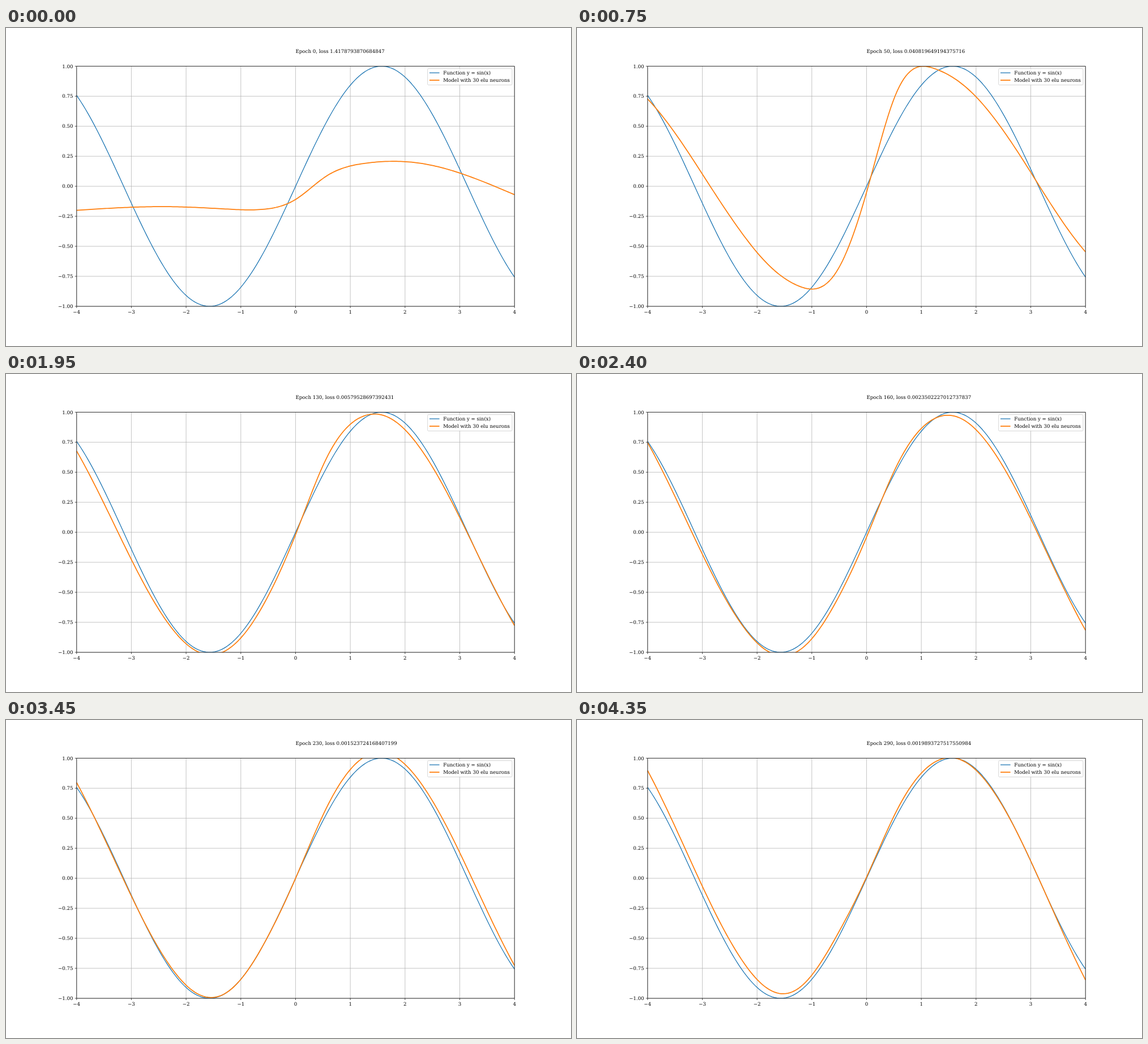
An HTML page that plays this animation: 998x561 px, repeating every 4500 ms.

```html
<!DOCTYPE html>
<html lang="en">
<head>
<meta charset="utf-8">
<title>Learning a sine</title>
<style>
  html, body { margin: 0; width: 100%; height: 100%; overflow: hidden; background: #fff; }
  svg { display: block; width: 100%; height: 100%; }
  text { font: 8.66px "DejaVu Serif", "Noto Serif", serif; fill: #000; text-rendering: geometricPrecision; }
</style>
</head>
<body>
<svg id="stage" viewBox="0 0 998 561">
  <clipPath id="plot"><rect x="124.75" y="67.4" width="773.45" height="423.6"/></clipPath>
</svg>
<script>
const svg = document.getElementById('stage');
const LEFT = 124.75, RIGHT = 898.2, TOP = 67.4, BOTTOM = 491;
const BLUE = '#1f77b4', ORANGE = '#ff7f0e';
const STEP = 150, LOOP = 4500;

const mix = (a, b, u) => a + (b - a) * u;
const px = x => mix(LEFT, RIGHT, (x + 4) / 8);
const py = y => mix(BOTTOM, TOP, (y + 1) / 2);

function add(tag, attrs, content = '') {
  const el = document.createElementNS(svg.namespaceURI, tag);
  for (const key in attrs) el.setAttribute(key, attrs[key]);
  el.textContent = content;
  return svg.appendChild(el);
}
const line = (d, stroke, width, extra) =>
  add('path', { d, stroke, 'stroke-width': width, fill: 'none', ...extra });
const label = (x, y, content, anchor = 'start') =>
  add('text', { x, y, 'text-anchor': anchor }, content);
const signed = (n, digits) => n.toFixed(digits).replace('-', '\u2212');

function curve(f) {
  let d = '';
  for (let i = 0; i <= 200; i++) {
    const x = -4 + i / 25;
    d += (i ? 'L' : 'M') + px(x).toFixed(2) + ' ' + py(f(x)).toFixed(2);
  }
  return d;
}

// The model is gain * sin(x) plus an error, in hundredths, at nine knots
// that are densest around zero, where the network bends most.
const knots = Array.from({ length: 9 }, (_, i) => Math.sinh((i / 4 - 1) * Math.asinh(4)));
const stages = [
  { epoch: 0, loss: 1.4178793870684847, gain: 0, error: [-20, -17, -19, -19, -11, 8, 19, 19, -7] },
  { epoch: 50, loss: 0.040819649194375716, gain: 1, error: [-3, 37, 12, -19, -5, 26, 3, -16, 21] },
  { epoch: 90, loss: 0.01501964473326628, gain: 1, error: [-13, 6, -5, -15, -4, 16, 4, -10, 12] },
  { epoch: 130, loss: 0.00579528697392431, gain: 1, error: [-8, -3, -3, -5, -2, 8, 2, -6, -2] },
  { epoch: 160, loss: 0.0023502227012737837, gain: 1, error: [-1, -1, -4, -5, -4, 3, 0, -6, -6] },
  { epoch: 230, loss: 0.001523724168407199, gain: 1, error: [4, 2, 0, 0, 0, 5, 6, 4, 3] },
  { epoch: 290, loss: 0.0019893727517550984, gain: 1, error: [14, 8, 3, 4, 1, 4, 2, -1, -9] }
];

// Cubic spline through (xs, ys) with the given curvature at both ends
function spline(xs, ys, first, last) {
  const n = xs.length, m = [first], c = [0], r = [first];
  m[n - 1] = last;
  for (let i = 1; i < n - 1; i++) {
    const h0 = xs[i] - xs[i - 1], h1 = xs[i + 1] - xs[i];
    const bend = (ys[i + 1] - ys[i]) / h1 - (ys[i] - ys[i - 1]) / h0;
    const p = 2 * (h0 + h1) - h0 * c[i - 1];
    c[i] = h1 / p;
    r[i] = (6 * bend - h0 * r[i - 1]) / p;
  }
  for (let i = n - 2; i > 0; i--) m[i] = r[i] - c[i] * m[i + 1];
  return x => {
    let i = 0;
    while (i < n - 2 && x > xs[i + 1]) i++;
    const h = xs[i + 1] - xs[i], b = (x - xs[i]) / h, a = 1 - b;
    return a * ys[i] + b * ys[i + 1] + ((a ** 3 - a) * m[i] + (b ** 3 - b) * m[i + 1]) * h * h / 6;
  };
}

function modelAt(epoch) {
  const i = stages.findLastIndex(s => s.epoch <= epoch);
  const a = stages[i], b = stages[i + 1] || a;
  let u = a === b ? 0 : (epoch - a.epoch) / (b.epoch - a.epoch);
  if (i === 0) u = 1 - (1 - u) ** 2; // learning is fastest at first
  const gain = mix(a.gain, b.gain, u);
  const tail = gain * Math.sin(4) / 2; // flattens the tails of the sine
  const error = spline(knots, a.error.map((e, k) => mix(e, b.error[k], u) / 100), -tail, tail);
  return {
    loss: a.loss * (b.loss / a.loss) ** u,
    f: x => gain * Math.sin(x) + error(x)
  };
}

// Grid, ticks and tick labels
for (let i = 0; i <= 8; i++) {
  const x = px(i - 4), y = py(i / 4 - 1);
  line(`M${x} ${TOP}V${BOTTOM}M${LEFT} ${y}H${RIGHT}`, '#b0b0b0', .75);
  line(`M${x} ${BOTTOM}v3M${LEFT} ${y}h-3`, '#000', .7);
  label(x, 503.8, signed(i - 4, 0), 'middle');
  label(118.6, y + 3.1, signed(i / 4 - 1, 2), 'end');
}

const clip = { 'clip-path': 'url(#plot)', 'stroke-linejoin': 'round' };
line(curve(Math.sin), BLUE, 1.3, clip);
const model = line('', ORANGE, 1.75, clip);
line(`M${LEFT} ${TOP}H${RIGHT}V${BOTTOM}H${LEFT}Z`, '#000', .75);

// Legend
add('rect', { x: 744.7, y: 71.7, width: 149.2, height: 28.8, rx: 1.7, fill: '#fff', 'fill-opacity': .8, stroke: '#ccc', 'stroke-width': .8 });
line('M748 79.1h17.6', BLUE, 1.3);
line('M748 92.1h17.6', ORANGE, 1.75);
label(772.2, 82.3, 'Function y = sin(x)');
label(772.2, 95.3, 'Model with 30 elu neurons');

const title = label(511.5, 44.3, '');

let shown = -1;
function draw(time) {
  const epoch = Math.floor(time % LOOP / STEP) * 10;
  if (epoch === shown) return;
  shown = epoch;
  const { loss, f } = modelAt(epoch);
  model.setAttribute('d', curve(f));
  title.textContent = `Epoch ${epoch}, loss ${loss}`;
}

let start;
function tick(now) {
  start ??= now;
  draw(now - start);
  requestAnimationFrame(tick);
}
draw(0);
requestAnimationFrame(tick);
</script>
</body>
</html>
```
